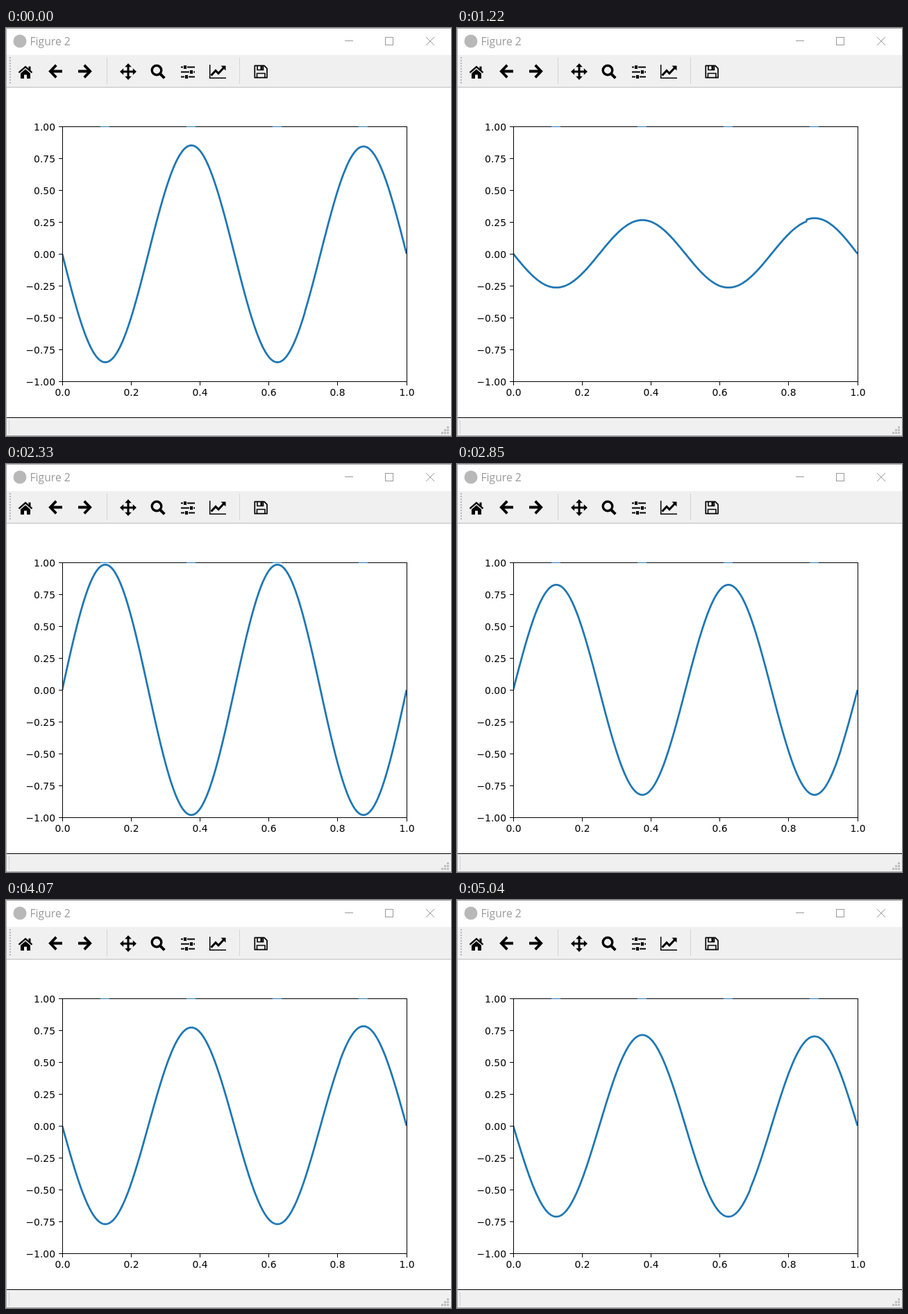
Recreate the animation shown at these times as an HTML page. Size 641 by 589 pixels, loop 5.11 s.

```html
<!DOCTYPE html>
<html lang="en">
<head>
<meta charset="utf-8">
<title>Figure 2</title>
<style>
  html, body { margin: 0; width: 100%; height: 100%; overflow: hidden; background: #fff; }
  svg { display: block; }
  .title { font: 15.7px "Open Sans", "Noto Sans", sans-serif; fill: #999; }
  .labels { font: 13.9px "DejaVu Sans", sans-serif; fill: #000; }
</style>
</head>
<body>
<svg width="641" height="589" viewBox="0 0 641 589">
  <defs><clipPath id="plot"><rect x="81" y="143" width="496" height="367"/></clipPath></defs>

  <!-- window -->
  <rect width="641" height="589" fill="#fff"/>
  <rect y="39" width="641" height="46" fill="#f0f0f0"/>
  <rect y="563" width="641" height="26" fill="#f0f0f0"/>
  <g fill="none" shape-rendering="crispEdges">
    <path d="M0 85.5H641" stroke="#bdbdbd"/>
    <path d="M0 562.5H641" stroke="#000"/>
    <path d="M145.5 43V81M336.5 43V81M4.5 566V586" stroke="#d2d2d2"/>
    <path d="M6 42V82" stroke="#b4b4b4" stroke-width="2" stroke-dasharray="2 2"/>
    <path d="M0 .5H641M.5 0V589M0 588.5H641" stroke="#a9a9a9"/>
  </g>
  <path d="M636 575h3v3h-3zM632 579h3v3h-3zM636 579h3v3h-3zM628 583h3v3h-3zM632 583h3v3h-3zM636 583h3v3h-3z"
        transform="translate(-1)" fill="#bfbfbf"/>
  <circle cx="20" cy="19" r="9.5" fill="#b8b8b8"/>
  <text class="title" x="34.5" y="25">Figure 2</text>
  <g fill="none" stroke="#999">
    <path d="M488 18.5H500M546.5 13.5h11v11h-11z" shape-rendering="crispEdges"/>
    <path d="M605 13L617 25M617 13L605 25"/>
  </g>

  <!-- toolbar -->
  <g fill="none" stroke="#000">
    <path d="M18.5 64.3L28 56.2 37.5 64.3" stroke-width="2.4"/>
    <path d="M32.5 55.5h3v6l-3-2.6zM28 59.6L35 65.6V73H30V67.5H26V73H21V65.6Z" fill="#000" stroke="none"/>
    <path d="M81 62.5H65M72.3 53.6L63.8 62.5 72.3 71.4" stroke-width="3.8"/>
    <path d="M104 62.5H120M112.7 53.6L121.2 62.5 112.7 71.4" stroke-width="3.8"/>
    <path d="M176 55V71M168 63H184" stroke-width="3"/>
    <path d="M176 51l4.8 5.2h-9.6zM176 75l4.8-5.2h-9.6zM164 63l5.2-4.8v9.6zM188 63l-5.2-4.8v9.6z" fill="#000" stroke="none"/>
    <circle cx="217" cy="61" r="6.8" stroke-width="3.4"/>
    <path d="M222 66L228.3 72.3" stroke-width="4"/>
    <path d="M252 56.5H272M252 63.5H272M252 70.5H272" stroke-width="1.8"/>
    <g stroke="#f0f0f0" fill="#000">
      <path d="M255.5 53.5h5v6h-5zM264.500 60.500h5v6h-5zM257.500 67.500h5v6h-5z"/>
    </g>
    <path d="M293.700 53V72.300H317" stroke-width="1.5"/>
    <path d="M295.500 68.500L302 61.500 306 65.500 313.500 57.500" stroke-width="3"/>
    <path d="M309.500 54.500H316.500V61.500Z" fill="#000" stroke="none"/>
    <path d="M358.300 54.300H372L376 58.300V71.700H358.300Z" stroke-width="1.7" stroke-linejoin="round"/>
    <path d="M361.500 71.500V65.500H373V71.500M362 54.500V60.500H370.500V54.500" stroke-width="1.6"/>
    <path d="M366.500 55h3v5h-3z" fill="#000" stroke="none"/>
  </g>

  <!-- chart -->
  <path id="wave" fill="none" stroke="#1f77b4" stroke-width="2.78" stroke-linejoin="round" clip-path="url(#plot)"/>
  <g shape-rendering="crispEdges" fill="none" stroke="#000">
    <rect x="81.500" y="142.500" width="496" height="368"/>
    <path id="ticks"/>
    <path d="M136 142.500h13m111 0h13m111 0h13m111 0h13" stroke="#1f77b4"/>
  </g>
  <g id="labels" class="labels"></g>
</svg>
<script>
const $ = id => document.getElementById(id);
const LEFT = 81, WIDTH = 496, MID = 326, HALF = 183.7;
const LOOP = 5110, PERIOD = 64.4, PEAK = 37.85, LAG = 0.16;

// First and last change of each run of steps, in ms, and the step count
const runs = [
  [50, 560, 9], [630, 1150, 9], [1220, 1740, 9], [1810, 2330, 9], [2380, 2900, 9],
  [2970, 3490, 9], [3560, 4070, 9], [4140, 4660, 9], [4730, 5040, 6]
];
const changes = runs.flatMap(([a, b, n]) =>
  Array.from({ length: n }, (_, i) => 10 * Math.floor((a + (b - a) * i / (n - 1)) / 10 + 1e-6)));

function label(text, x, y, anchor) {
  const el = document.createElementNS("http://www.w3.org/2000/svg", "text");
  el.setAttribute("x", x);
  el.setAttribute("y", y);
  el.setAttribute("text-anchor", anchor);
  el.textContent = text;
  $("labels").append(el);
}

function drawAxes() {
  let d = "";
  for (let i = 0; i <= 5; i++) {
    const x = Math.floor(LEFT + WIDTH * i / 5) + 0.5;
    d += `M${x} 511v5`;
    label((i / 5).toFixed(1), x, 531, "middle");
  }
  for (let i = -4; i <= 4; i++) {
    const y = 326.5 - 46 * i;
    d += `M76 ${y}h5`;
    label((i < 0 ? "\u2212" : "") + Math.abs(i / 4).toFixed(2), 71, y + 5.3, "end");
  }
  $("ticks").setAttribute("d", d);
}

const amp = n => Math.cos(2 * Math.PI * (n - PEAK) / PERIOD);

// Standing wave; a small step travels along it and reflects at the right end
function wavePath(step) {
  const front = 1 - Math.abs(step - 38) * 0.5 / PERIOD;
  const near = amp(step);
  const far = amp(step + (step < 38 ? -LAG : LAG));
  const points = [];
  for (let i = 0; i <= WIDTH; i++) {
    const x = i / WIDTH;
    const y = (x < front ? near : far) * Math.sin(4 * Math.PI * x);
    points.push(`${LEFT + i} ${(MID - HALF * y).toFixed(2)}`);
  }
  return "M" + points.join("L");
}

let shown = -1;
function render(ms) {
  const t = ms % LOOP;
  const step = changes.filter(c => c <= t).length;
  if (step === shown) return;
  shown = step;
  $("wave").setAttribute("d", wavePath(step));
}

drawAxes();
render(0);
let start;
requestAnimationFrame(function tick(now) {
  start ??= now;
  render(now - start);
  requestAnimationFrame(tick);
});
</script>
</body>
</html>
```
